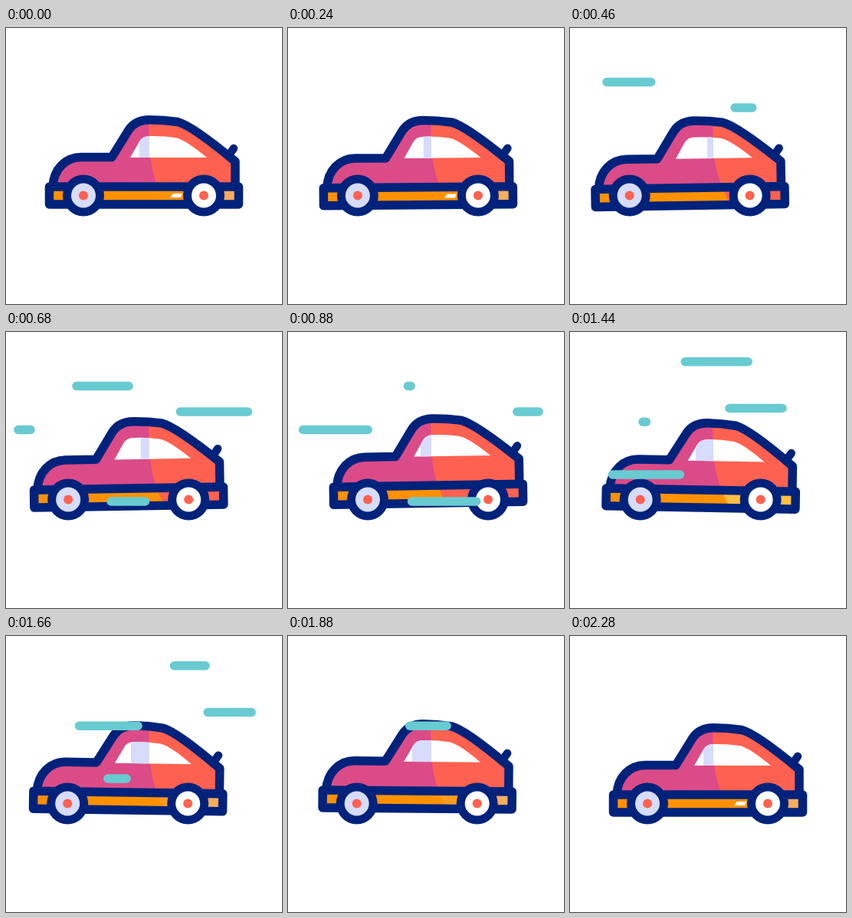
An HTML page with a canvas for the animation above (2400 ms loop, 360x360 px).

```html
<!DOCTYPE html>
<html>
<head>
<meta charset="utf-8">
<style>
  html, body { margin: 0; width: 100%; height: 100%; overflow: hidden; background: #fff; }
  canvas { display: block; width: 360px; height: 360px; }
</style>
</head>
<body>
<canvas id="stage"></canvas>
<script>
const LOOP = 2400;
const NAVY = '#00227a', CORAL = '#ff6150', PINK = '#db4b88', ORANGE = '#ff9100',
      LAVENDER = '#d6dcf9', TEAL = '#68cbd1', WHITE = '#fff';

const canvas = document.getElementById('stage');
const ratio = window.devicePixelRatio || 1;
canvas.width = canvas.height = 360 * ratio;
const ctx = canvas.getContext('2d');

const body = new Path2D('M61 207C62 184 78 168.5 98 168.5H138L160 133C166 124 176 119.7 187 119.7C200 119.8 214 121 224 122.5C238 126 270 150 299 174V207');
const spoiler = new Path2D('M290 167L297 157');
const bumper = new Path2D('M56.5 207H303.5V230H56.5Z');
const windowPane = new Path2D('M162 169L174 148Q178 141 187 141Q205 140.5 221 143Q233 145 262 169Z');
const glint = new Path2D('M218 216H230L228 221H214Z');
// The lit side stays put on the stage while the car moves through it
const litSide = new Path2D('M186.5 80V140C187 175 193 200 207 226V270H360V80Z');

// Each key is [time, value]
const shiftKeys = [[0, 0], [560, -25.5], [1100, 19], [1630, -21], [2160, 0]];
const liftKeys = [[0, 0], [460, 1.5], [880, -6.7], [1440, -1], [1880, -5], [2260, 0]];
const tiltKeys = [[0, 0], [460, -0.9], [880, -0.95], [1440, 1], [2260, 0]];
const shadeKeys = [[0, 174], [460, 179], [880, 173], [1200, 187], [1440, 164], [1880, 162], [2260, 174]];

// Wind streaks: [start time, left end, y]
const streaks = [
  [242, 42, 70.5], [337, 209, 104], [496, 131, 221], [579, 10, 127.5],
  [1105, 39, 186], [1151, 142, 38.7], [1193, 202, 99.5], [1391, 89, 117.3]
];

function ease(u) {
  u = Math.min(1, Math.max(0, u));
  return u * u * (3 - 2 * u);
}

function valueAt(keys, t) {
  const next = keys.findIndex(k => k[0] > t);
  if (next < 0) return keys[keys.length - 1][1];
  const [t0, a] = keys[next - 1], [t1, b] = keys[next];
  return a + (b - a) * ease((t - t0) / (t1 - t0));
}

function fill(path, color) {
  ctx.fillStyle = color;
  ctx.fill(path);
}

function stroke(path, color, width) {
  ctx.strokeStyle = color;
  ctx.lineWidth = width;
  ctx.stroke(path);
}

function disc(x, y, radius, color) {
  const path = new Path2D();
  path.arc(x, y, radius, 0, Math.PI * 2);
  fill(path, color);
}

function clipped(region, draw) {
  ctx.save();
  ctx.clip(region);
  draw();
  ctx.restore();
}

function litBumperColor(t) {
  if (t < 250 || t > 2100) return ORANGE;
  if (t < 1040) return CORAL;
  return t < 1660 ? '#ffbe45' : '#ff9c20';
}

function drawCar(t) {
  const shift = valueAt(shiftKeys, t);

  function posed(draw) {
    ctx.save();
    ctx.translate(180 + shift, 218 + valueAt(liftKeys, t));
    ctx.rotate(valueAt(tiltKeys, t) * Math.PI / 180);
    ctx.translate(-180, -218);
    draw();
    ctx.restore();
  }

  posed(() => {
    fill(body, PINK);
    fill(bumper, ORANGE);
  });
  clipped(litSide, () => posed(() => {
    fill(body, CORAL);
    fill(bumper, litBumperColor(t));
    ctx.fillStyle = t < 250 || t > 1660 ? '#f8ad5c' : litBumperColor(t);
    ctx.fillRect(270, 207, 33, 23);
  }));
  posed(() => fill(windowPane, WHITE));

  const shadeLeft = valueAt(shadeKeys, t);
  const shade = new Path2D();
  shade.rect(shadeLeft, 80, Math.max(0, 187 - shadeLeft), 120);
  clipped(shade, () => posed(() => fill(windowPane, LAVENDER)));

  posed(() => {
    if (t < 250 || t > 2100) fill(glint, WHITE);
    stroke(spoiler, NAVY, 10.5);
    stroke(body, NAVY, 11.5);
    stroke(bumper, NAVY, 11.5);
  });

  for (const [x, color] of [[101, LAVENDER], [258, WHITE]]) {
    disc(x + shift, 218.5, 27, NAVY);
    disc(x + shift, 218.5, 16, color);
    disc(x + shift, 218.5, 6, CORAL);
  }
}

function drawStreak(t, [start, left, y]) {
  const head = ease((t - start) / 430);
  const tail = ease((t - start - 255) / 430);
  if (t < start || tail > 0.995) return;
  const line = new Path2D();
  line.moveTo(left + 6 + tail * 112, y);
  line.lineTo(left + 6.1 + head * 112, y);
  stroke(line, TEAL, 11.5);
}

function frame(now) {
  const t = now % LOOP;
  ctx.setTransform(ratio, 0, 0, ratio, 0, 0);
  ctx.fillStyle = WHITE;
  ctx.fillRect(0, 0, 360, 360);
  ctx.lineCap = ctx.lineJoin = 'round';
  drawCar(t);
  streaks.forEach(streak => drawStreak(t, streak));
}

const begin = performance.now();
function tick() {
  frame(performance.now() - begin);
  requestAnimationFrame(tick);
}
tick();
</script>
</body>
</html>
```
